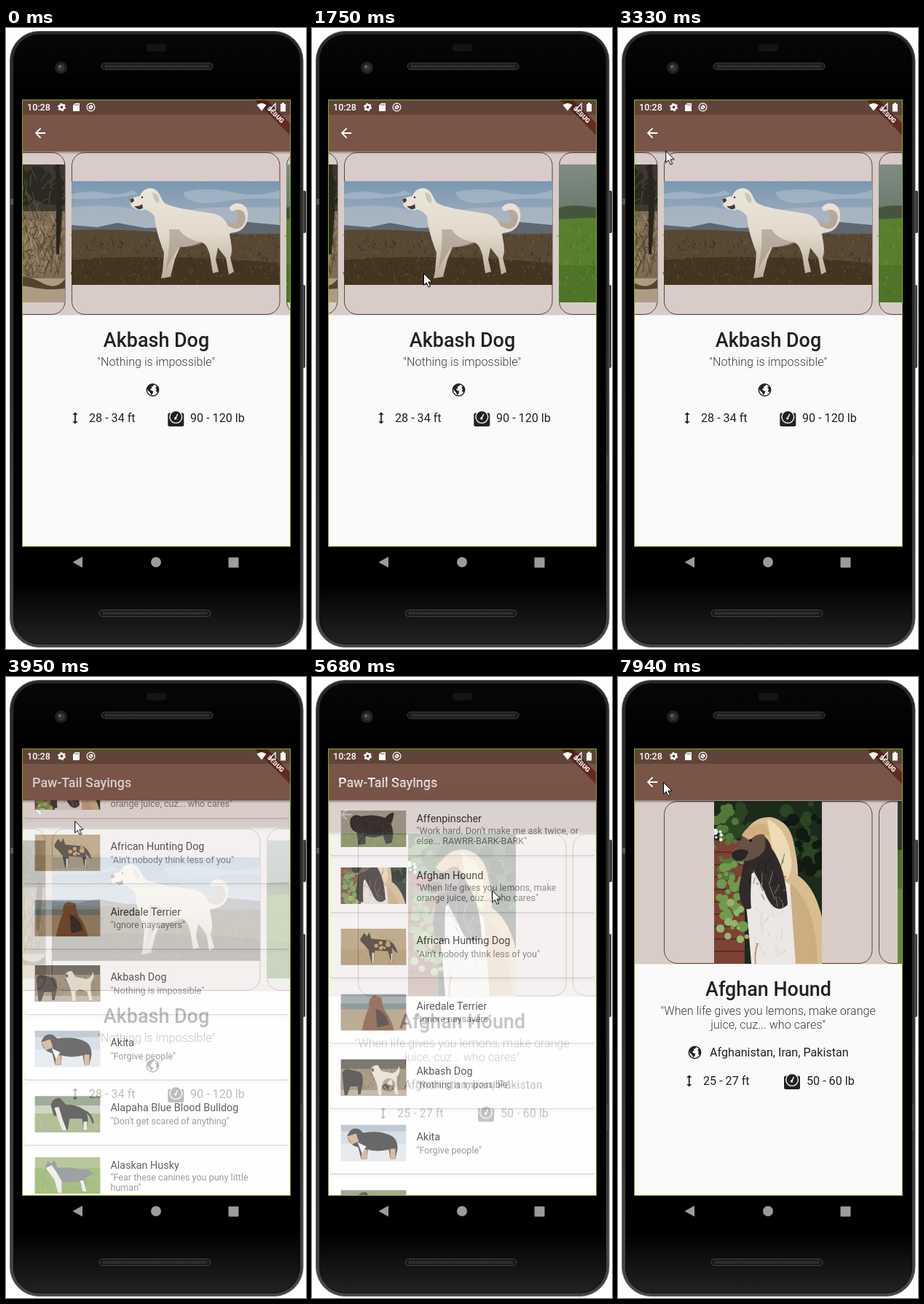
An HTML page that plays this animation: 412x851 px, repeating every 8 s.

```html
<!DOCTYPE html>
<html lang="en">
<head>
<meta charset="utf-8">
<title>Dog quotes app</title>
<style>
  html, body { margin: 0; width: 100%; height: 100%; overflow: hidden; background: #fff; }
  #stage { display: block; width: 100%; height: 100%; font-family: Roboto, sans-serif; }
</style>
</head>
<body>
<svg id="stage" viewBox="0 0 412 851"></svg>
<script>
const LOOP = 8000;
const INK = '#212121', BROWN = '#795548', PINK = '#d7ccc8', PAPER = '#fafafa';

let seed = 11;
const rnd = () => (seed = seed * 16807 % 2147483647) / 2147483647;

// --- drawing helpers ---
const rect = (x, y, w, h, fill, more = '') =>
  `<rect x="${x}" y="${y}" width="${w}" height="${h}" fill="${fill}" ${more}/>`;
const dot = (x, y, r, fill, more = '') => `<circle cx="${x}" cy="${y}" r="${r}" fill="${fill}" ${more}/>`;
const path = (d, fill, more = '') => `<path d="${d}" fill="${fill}" ${more}/>`;
const line = (d, stroke, width = 1, more = '') =>
  `<path d="${d}" fill="none" stroke="${stroke}" stroke-width="${width}" ${more}/>`;
const text = (x, y, size, s, more = '') =>
  `<text x="${x}" y="${y}" font-size="${size}" fill="${INK}" ${more}>${s}</text>`;
const group = (id, body) => `<g id="${id}">${body}</g>`;
const photo = (x, y, w, h, box, body) =>
  `<svg x="${x}" y="${y}" width="${w}" height="${h}" viewBox="${box}" preserveAspectRatio="none">${body}</svg>`;
const icon = (cx, cy, d, fill = INK) =>
  path(d, fill, `transform="translate(${cx - 10.77} ${cy - 10.77}) scale(.897)"`);
const fade = (id, ...stops) => `<linearGradient id="${id}" x2="0" y2="1">${stops.map(([at, c, o = 1]) =>
  `<stop offset="${at}" stop-color="${c}" stop-opacity="${o}"/>`).join('')}</linearGradient>`;

function tufts(count, x, y, w, h, len, color, width = 1) {
  let d = '';
  for (let i = 0; i < count; i++) {
    d += `M${(x + rnd() * w).toFixed(1)} ${(y + rnd() * h).toFixed(1)}l${((rnd() - .5) * len).toFixed(1)} ${(-len * rnd()).toFixed(1)}`;
  }
  return line(d, color, width, 'opacity=".65"');
}
function blobs(count, x, y, w, h, r, color) {
  let s = '';
  for (let i = 0; i < count; i++) s += dot((x + rnd() * w).toFixed(1), (y + rnd() * h).toFixed(1), (r * (.5 + rnd())).toFixed(1), color);
  return s;
}

// --- large photos ---
const akbash =
  rect(63, 210, 286, 142, 'url(#sky)') +
  path('M63 228Q85 221 108 226T146 222L155 228Q110 236 63 234ZM216 225Q250 217 285 225T349 222V234Q305 232 270 238T220 233Z', '#b9c5cf', 'opacity=".5"') +
  path('M63 246Q100 240 141 247T220 249T349 246V274H63Z', '#aebac4', 'opacity=".7"') +
  path('M63 270L98 273L126 267L164 274L270 272L305 266L349 270V291H63Z', '#5f6770') +
  path('M63 277Q118 275 172 279T349 282V352H63Z', '#574833') +
  path('M63 318Q180 308 349 322V352H63Z', '#423522') +
  tufts(190, 63, 284, 286, 68, 5, '#7b6848') + tufts(230, 63, 286, 286, 66, 6, '#2d2419') +
  path('M143 236C146 231 152 232 157 230C160 222 169 217 177 221C185 225 185 234 191 240C204 247 235 251 257 254C267 256 274 262 277 270C287 278 301 272 302 260C302 250 294 247 287 250C283 252 280 250 280 246C286 238 299 238 304 249C308 262 302 275 291 279C286 281 282 280 280 282C282 295 285 304 281 315L286 334L279 338L275 315L264 301L261 317L265 334L257 336L253 311C250 301 247 294 240 294C230 298 221 300 212 300L205 317L199 341L186 343L188 333L190 308C183 290 178 272 177 258C171 251 165 247 160 250C152 250 147 246 145 244Z', 'url(#fur)') +
  path('M277 270C291 282 303 271 301 259C299 249 291 248 286 251C292 252 294 258 291 263C288 269 282 268 277 264Z', '#b9a796') +
  path('M197 276Q199 298 192 332L200 317L210 301Q234 300 245 294Q220 291 211 276Z', '#9b8f7f', 'opacity=".55"') +
  path('M174 225Q185 228 183 240Q176 240 174 225Z', '#d0c4b3') +
  path('M143 235l5-2 1 4-4 3ZM149 244q7 1 11-3l1 6q-6 4-12-3Z', '#453a33') + dot(160, 232, 1.2, '#2b241e');

const thicket =
  rect(0, 0, 286, 189, '#7d6b53') + rect(0, 0, 286, 64, '#3d392f') + rect(0, 156, 286, 33, '#ad9b83') +
  blobs(40, 200, 0, 86, 55, 8, '#2a2922') + tufts(50, 200, 20, 86, 55, 20, '#71664e') +
  tufts(130, 200, 85, 86, 68, 26, '#b09a75') + tufts(150, 200, 75, 86, 80, 24, '#3b3022') +
  path('M200 158Q230 148 252 161T286 157V170Q260 173 240 168T200 174Z', '#51452f') +
  path('M274 0l5 0 3 65-4 58h-4Z', '#29251e');

const meadow =
  rect(358, 187, 286, 189, 'url(#mist)') +
  path('M358 246Q378 241 400 245T644 236V272H358Z', '#46543d') +
  path('M358 262Q440 256 644 264V376H358Z', '#587f2e') + rect(358, 325, 286, 51, '#4b7026', 'opacity=".7"') +
  tufts(130, 358, 272, 90, 102, 5, '#779744') + tufts(90, 358, 270, 90, 105, 5, '#3d5d20');

const afghan =
  rect(132, 170, 148, 223, '#1c2a1a') +
  blobs(45, 150, 172, 130, 120, 7, '#2b4424') + blobs(18, 230, 178, 50, 90, 6, '#101a10') +
  rect(132, 224, 42, 169, '#7d4234') +
  line('M132 240h42M132 257h42M132 274h42M132 291h42M132 308h42M132 325h42M132 342h42M132 359h42M132 376h42', '#4d2a24', 1.5) +
  blobs(26, 132, 178, 30, 95, 5, '#51793a') + blobs(34, 138, 235, 34, 110, 5, '#6e9b4d') + blobs(12, 140, 300, 38, 70, 4, '#94b56e') +
  blobs(5, 132, 207, 10, 16, 3, '#e8eee5') +
  path('M178 207Q190 191 210 192Q236 198 241 226Q248 256 247 272Q270 287 280 329V393H196L212 260Z', '#d8bd91') +
  path('M205 195Q232 205 238 250Q240 266 232 278L211 230Z', '#eddbb7') +
  path('M172 278Q192 259 210 268L241 287Q257 340 251 393H183Q178 325 172 278Z', '#ebe7e4') +
  path('M236 282Q272 310 274 393H244Z', '#ccac81') +
  path('M180 215Q205 211 211 235Q230 260 233 312Q214 330 200 291L184 262Q181 301 183 317Q168 324 166 289Q171 264 174 247Z', '#302b2a') +
  path('M157 242Q166 231 171 218Q179 203 195 207Q206 218 201 238Q190 252 169 253Q157 252 157 242Z', '#665143') +
  path('M170 217Q180 198 204 202L209 219Q192 210 181 224Z', '#d3ae80') +
  path('M156 241Q169 232 179 239Q176 253 163 252Q155 249 156 241Z', '#2a2422') + dot(182, 224, 2, '#1a1412') +
  tufts(35, 190, 278, 55, 112, 22, '#c6bebb', .8) + tufts(30, 172, 248, 58, 60, 18, '#151313', .8) +
  line('M192 365q-5 12-3 28', '#b6674e', 2, 'stroke-dasharray="2 1"');

const garden = rect(384, 170, 286, 223, '#2c392b') + rect(384, 237, 286, 156, '#52702e') + rect(384, 290, 286, 103, '#648c36');

// --- list thumbnails, 90 by 50 ---
const scene = (sky, ground, horizon) => rect(0, 0, 90, 50, sky) + rect(0, horizon, 90, 50 - horizon, ground);
const thumbs = [
  scene('#aaa69a', '#77854f', 31) + tufts(60, 0, 32, 90, 18, 4, '#a9b481', .6) +
    path('M13 12Q18 3 28 8Q45 4 61 10Q67 2 73 3Q72 13 69 18Q74 30 70 44L62 46L58 34Q45 39 34 35L34 46L24 47L22 30Q11 26 13 12Z', '#222223') +
    tufts(45, 18, 14, 52, 28, 6, '#4b4a49', .7),
  null,
  scene('#b8a27a', '#ad956a', 28) + tufts(70, 0, 10, 90, 40, 4, '#897249', .6) +
    path('M27 14L32 6L36 11L39 5L42 14L66 16Q75 20 78 34L74 31L70 26L72 46H69L65 31L47 30L45 47H42L38 29Q33 22 27 17Z', '#372d23') +
    blobs(9, 40, 17, 27, 10, 2, '#bd9557') + path('M43 33v14h2l1-14ZM69 34v12h2v-12Z', '#e2d7bd'),
  scene('#8b969c', '#a58e70', 20) + rect(0, 13, 90, 8, '#6c7879') +
    path('M29 50Q33 30 39 18Q37 5 46 2L56 5Q57 17 61 23Q70 35 73 50Z', '#74462a') +
    path('M48 20Q62 23 66 42L50 46Z', '#2e241e'),
  scene('#4e4a3e', '#8d7c61', 13) + rect(0, 42, 90, 8, '#b3a38d') +
    tufts(110, 0, 13, 90, 30, 7, '#4b402f', .5) + tufts(70, 0, 13, 90, 30, 7, '#b5a27f', .5) +
    path('M2 19Q5 11 13 14L25 17Q32 20 30 35L27 48H24L23 37H13L9 49H5Q4 35 2 19Z', '#2d2a26') +
    path('M41 14Q44 7 51 8L56 16L71 19Q78 17 80 9Q83 17 77 24L77 35L79 48H75L72 36L62 33L56 36L56 49H52L49 32Q45 23 41 14Z', '#e5ddcd') +
    path('M41 13l4-1 1 4-3 1Z', '#544b40'),
  scene('#cbd4dd', '#e0e5ec', 26) + rect(0, 0, 90, 9, '#acb8c5') +
    path('M9 15Q14 2 25 6L31 11Q52 7 67 14Q78 18 78 33L75 47H68L66 34Q50 38 37 34L36 47H28L24 31Q11 28 9 15Z', '#353334') +
    path('M9 16l12-4 4 11-10 4ZM29 34h7v13h-8ZM68 33h7v14h-7Z', '#cda783') + path('M23 24l12 6-6 9Z', '#f0eeec'),
  scene('#bbc5ac', '#92a66b', 24) + tufts(45, 0, 28, 90, 22, 4, '#c3cda3', .6) + rect(0, 0, 90, 13, '#7c8b6e') +
    path('M22 12Q25 2 35 3L43 12Q56 11 68 19Q75 25 72 45H67L65 31L48 31L45 47H38L34 28L26 27Z', '#2b292a') +
    path('M27 16l6-1 6 19 5 13h-6L31 29ZM67 35h5v11h-5Z', '#e6e3dc') + line('M69 21q9 4 11 16', '#2b292a', 3),
  scene('#9cb173', '#83a44d', 15) + tufts(80, 0, 8, 90, 42, 5, '#c2d295', .6) +
    path('M14 15L18 5L22 9L27 4L31 15Q47 12 62 17Q76 15 80 24Q72 25 69 30L71 47H66L61 33Q48 36 38 34L37 49H32L27 30Z', '#777b80') +
    path('M15 15l8-4 6 8 8 14v16h-5l-5-18ZM62 32h5l4 15h-5Z', '#eceae5')
];
const thumb = (i, y) => i === 1
  ? photo(39.5, y, 90, 50, '132 240 148 82', afghan)
  : photo(39.5, y, 90, 50, '0 0 90 50', thumbs[i]);

// --- app pages ---
const BACK = 'M20 11H7.83l5.59-5.59L12 4l-8 8 8 8 1.41-1.41L7.83 13H20v-2z';
const HEIGHT = 'M13 6.99h3L12 3 8 6.99h3v10.02H8L12 21l4-3.99h-3z';
const LAND = 'M4 7Q8 2.500 14 3L13 6L10 7L11 9L8 11L10 13L13 14L12 17L10 20L8 16L4 12ZM16 8L20 6L21.500 12L19 16L17 14L18 11Z';

const appBar = rect(22, 169, 369, 4, 'url(#shade)') + rect(22, 98, 369, 71, BROWN);
const card = x => rect(x + .5, 170.5, 285.5, 222, PINK, 'rx="18" stroke="#5d4037" stroke-width="1"');
const globe = (x, y) => dot(x, y, 8.2, PAPER, `stroke="${INK}" stroke-width="1.5"`) + icon(x, y, LAND);
const scale = (x, y) =>
  rect(x - 11, y - 7.5, 22, 18.5, INK, 'rx="2.5"') +
  dot(x, y - 2, 8.4, INK, `stroke="${PAPER}" stroke-width="1.4"`) +
  line(`M${x - .5} ${y}L${x + 2.5} ${y - 6}`, PAPER, 1.5) + dot(x - .5, y, 1.7, PAPER);

const detail = (id, cards, info) => group(id,
  rect(22, 98, 369, 613, PAPER) + rect(22, 169, 369, 224.5, PINK) + cards +
  appBar + icon(47, 144, BACK, '#fff') + info);
const heading = (title, ...quote) =>
  text(206.5, 436.5, 26.9, title, 'font-weight="500" text-anchor="middle"') +
  quote.map((q, i) => text(206.2, 462.7 + 19 * i, 16.15, q, 'font-weight="300" fill-opacity=".87" text-anchor="middle"')).join('');

const akbashPage = detail('akbash',
  group('carousel', card(-232) + card(63) + card(358) +
    photo(-232, 187, 286, 189, '0 0 286 189', thicket) + akbash + meadow),
  heading('Akbash Dog', '"Nothing is impossible"') + globe(201.5, 496) +
  icon(95, 534.5, HEIGHT) + text(114, 540, 16.15, '28 - 34 ft') +
  scale(233.3, 535) + text(253, 540, 16.15, '90 - 120 lb'));

const afghanPage = detail('afghan',
  card(63) + card(358) + photo(132, 170, 148, 223, '132 170 148 223', afghan) + group('late', garden),
  heading('Afghan Hound', '"When life gives you lemons, make orange', 'juice, cuz... who cares"') +
  globe(105.5, 514.5) + text(126, 520, 16.15, 'Afghanistan, Iran, Pakistan') +
  icon(97.7, 553.5, HEIGHT) + text(117, 559, 16.15, '25 - 27 ft') +
  scale(239, 554) + text(259, 559, 16.15, '50 - 60 lb'));

const dogs = [
  ['Affenpinscher', '"Work hard. Don\'t make me ask twice, or', 'else... RAWRR-BARK-BARK"'],
  ['Afghan Hound', '"When life gives you lemons, make', 'orange juice, cuz... who cares"'],
  ['African Hunting Dog', '"Ain\'t nobody think less of you"'],
  ['Airedale Terrier', '"Ignore naysayers"'],
  ['Akbash Dog', '"Nothing is impossible"'],
  ['Akita', '"Forgive people"'],
  ['Alapaha Blue Blood Bulldog', '"Don\'t get scared of anything"'],
  ['Alaskan Husky', '"Fear these canines you puny little', 'human"']
];
let rowTop = 169;
const rows = dogs.map(([name, ...quote], i) => {
  const single = quote.length === 1, pitch = single ? 89.6 : 78;
  const mid = rowTop + pitch / 2, half = pitch / 2 - 2.8;
  rowTop += pitch;
  return rect(25, mid - half + 1.3, 363, half * 2, '#000', 'rx="3.5" opacity=".18"') +
    rect(25, mid - half, 363, half * 2, '#fff', 'rx="3.5"') + thumb(i, mid - 25) +
    text(143.5, mid - (single ? 3.8 : 9), 14.35, name) +
    quote.map((q, n) => text(143.5, mid + (single ? 14 : 6.5) + 14 * n, 12.56, q, 'fill-opacity=".62"')).join('');
}).join('');
const listPage = rect(22, 98, 369, 613, PAPER) + group('list', rows) + appBar +
  text(36, 151, 17.94, 'Paw-Tail Sayings', 'font-weight="500" style="fill:#fff"');

// --- phone and system chrome ---
const grille = (x, y) => rect(x, y, 153, 9, '#191919', 'rx="4.5" stroke="#444"') +
  line(`M${x + 5} ${y + 4.5}h143`, '#3a3a3a', 4, 'stroke-dasharray="1.5 1"');
const phone =
  rect(405, 223, 7, 58, '#3a3a3a', 'rx="2"') + rect(405, 352, 6, 114, '#3a3a3a', 'rx="2"') +
  rect(5.5, 4.5, 402.5, 844, 'url(#rim)', 'rx="40" stroke="#606060"') +
  rect(10.5, 9, 393, 835, 'url(#glass)', 'rx="35" stroke="#0a0a0a"') +
  rect(6, 234, 4, 8, '#555') + rect(404, 585, 4, 36, '#444') +
  rect(193, 22, 27, 10, '#141414', 'rx="3"') +
  dot(75.5, 54.5, 8.5, '#202020') + dot(75.5, 54.5, 5, '#343434') + dot(74, 53, 2, '#666') +
  grille(131, 48) + grille(128, 797.5) +
  path('M91.5 732L105 724.5V739.5Z', '#9b9b9b') + dot(206, 732, 7, '#9b9b9b') + rect(305.5, 725.5, 14, 14, '#9b9b9b', 'rx="1"');
const statusBar =
  rect(22, 98, 369, 21, '#000', 'opacity=".2"') +
  text(29, 113, 12.56, '10:28', 'font-weight="500" style="fill:#fff"') +
  dot(76.5, 108.5, 3.2, 'none', 'stroke="#fff" stroke-width="2.6"') + dot(76.5, 108.5, 4.8, 'none', 'stroke="#fff" stroke-width="1.6" stroke-dasharray="2.5 2.5"') +
  path('M95 103H101V114H92V106Z', '#fff') + line('M95 104v2.500M97 104v2.500M99 104v2.500', '#614439', .8) +
  dot(116.5, 108.5, 5.4, 'none', 'stroke="#fff" stroke-width="1.2"') + dot(116.5, 108.5, 3, '#fff') +
  line('M114 106l5 5', '#614439') +
  path('M344.500 105.500Q351 100.500 357.500 105.500L351 113.500Z', '#fff') + line('M361 113H370V103.500Z', '#fff', 1.2) +
  path('M377 104h2v-1.500h3V104h2v10.500h-7Z', '#fff');
const banner = `<g transform="translate(370.500 118.700) rotate(45)">` +
  rect(-37, -5.4, 74, 10.8, '#000', 'opacity=".25" transform="translate(0 1)"') +
  rect(-36, -5.4, 72, 10.8, '#642a20') +
  text(0, 3.1, 8.8, 'DEBUG', 'font-weight="900" text-anchor="middle" style="fill:#fff"') + '</g>';

document.getElementById('stage').innerHTML =
  '<defs>' + fade('sky', [0, '#7b97b1'], [.45, '#a0b1c0']) + fade('mist', [0, '#7f8c87'], [.35, '#687a6c']) +
  fade('fur', [0, '#ece5da'], [.5, '#e3dacc'], [1, '#b9ac99']) +
  fade('rim', [0, '#2a2a2a'], [.5, '#2c2c2c'], [1, '#454545']) +
  fade('glass', [0, '#070707'], [.1, '#000'], [.9, '#000'], [1, '#222']) +
  fade('shade', [0, '#000', .35], [1, '#000', 0]) +
  '<clipPath id="screen"><rect x="22" y="98" width="369" height="613"/></clipPath></defs>' + phone +
  `<g clip-path="url(#screen)">${listPage}${akbashPage}${afghanPage}${banner}${statusBar}</g>` +
  rect(22.5, 98.5, 368, 612, 'none', 'stroke="#86a812"') +
  group('cursor', path('M.5 .5V16.500L4.200 13L7 19L9.500 18L6.800 12H12Z', '#fff', 'stroke="#000" stroke-width="1" stroke-linejoin="round"'));

// --- motion: [time, value, easing to the next step] ---
function play(id, steps, frame) {
  const last = steps[steps.length - 1];
  const all = [...(steps[0][0] ? [[0, steps[0][1]]] : []), ...steps, [LOOP, last[1]]];
  const frames = all.map(([t, v, easing = 'linear']) => ({ offset: t / LOOP, easing, ...frame(v) }));
  document.getElementById(id).animate(frames, { duration: LOOP, iterations: Infinity });
}
const moveX = v => ({ transform: `translate(${v}px, 0px)` });
const moveY = v => ({ transform: `translate(0px, ${v}px)` });
const move = ([x, y]) => ({ transform: `translate(${x}px, ${y}px)` });
const alpha = v => ({ opacity: v });
const SETTLE = 'cubic-bezier(.2,.6,.3,1)', GLIDE = 'ease-in-out', HOLD = 'steps(1, end)';

play('carousel', [[0, 27], [20, 27, SETTLE], [420, 0], [1560, 0, GLIDE], [1750, -19], [1800, -22], [1870, -22, SETTLE], [2230, 0]], moveX);

play('akbash', [[3797, 0, 'cubic-bezier(.8,0,.6,1)'], [4097, 153]], moveY);
play('akbash', [[3797, 1, 'cubic-bezier(0,0,.58,1)'], [4097, 0]], alpha);

play('list', [[4620, -129, 'cubic-bezier(.3,.2,.3,1)'], [5260, 0]], moveY);

play('afghan', [[5545, 153, 'cubic-bezier(.4,0,.2,1)'], [5845, 0]], moveY);
play('afghan', [[5545, 0, 'cubic-bezier(.42,0,1,1)'], [5845, 1]], alpha);
play('late', [[0, 0, HOLD], [6470, 1]], alpha);

play('cursor', [
  [0, [400, 862]], [250, [400, 862], GLIDE], [800, [275, 348]], [830, [275, 349]],
  [1040, [275, 349], GLIDE], [1330, [232, 462], GLIDE], [1560, [186, 340]], [1750, [153, 336]], [1800, [150, 336]],
  [1870, [150, 336], GLIDE], [2400, [277, 552], GLIDE], [2500, [270, 580]], [2650, [188, 513]],
  [2680, [188, 513], GLIDE], [3470, [57, 145]], [3500, [57, 144]], [3590, [43, 139]],
  [3770, [43, 139], GLIDE], [3950, [94, 197]], [4520, [215, 262]],
  [4620, [215, 262], GLIDE], [4950, [226, 390], GLIDE], [5320, [232, 271]],
  [5430, [232, 271], HOLD], [5432, [242, 273]],
  [5580, [242, 273]], [5680, [247, 292]], [6380, [300, 540]],
  [6430, [300, 540], GLIDE], [6600, [284, 581], GLIDE], [7230, [88, 297]],
  [7260, [88, 297], GLIDE], [7760, [51, 133]], [7940, [62, 144]]
], move);
</script>
</body>
</html>
```
